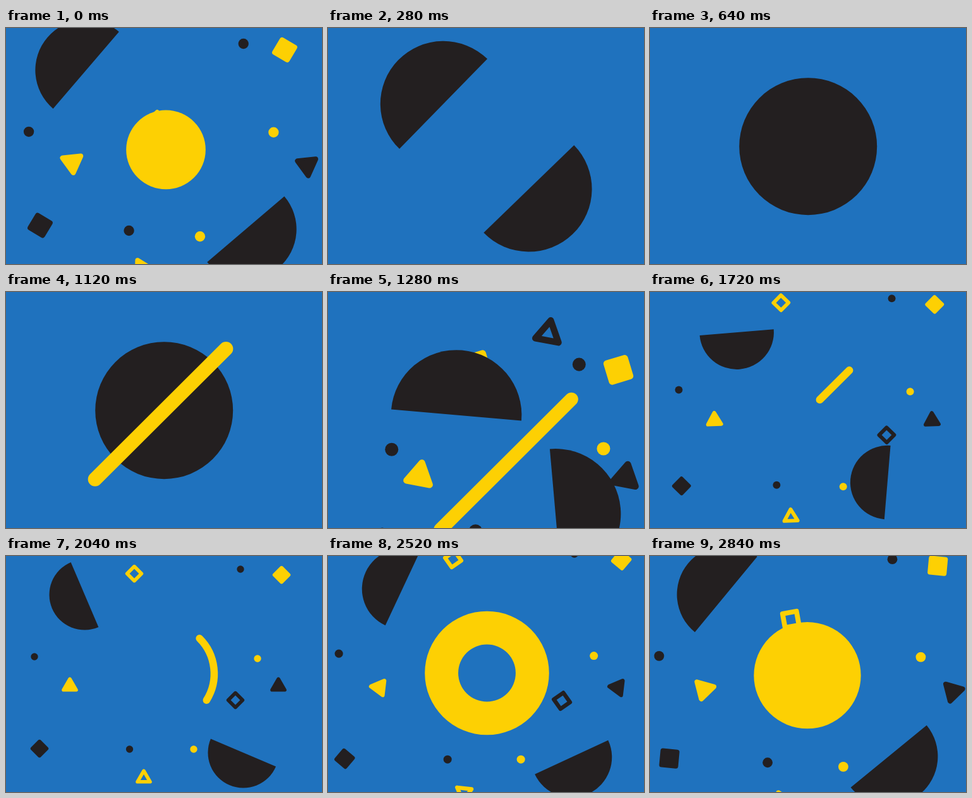
Recreate the animation shown at these times as an HTML page with a canvas. Size 500x375 px, loop 2.88 s.

```html
<!DOCTYPE html>
<html lang="en">
<head>
<meta charset="utf-8">
<title>Shape burst</title>
<style>
  html, body { margin: 0; width: 100%; height: 100%; overflow: hidden; background: #1f72be; }
  canvas { display: block; width: 500px; height: 375px; }
</style>
</head>
<body>
<canvas id="stage" width="500" height="375"></canvas>
<script>
const ctx = document.getElementById('stage').getContext('2d');
const LOOP = 2880, STEP = 40, BURST = 1120;
const BLUE = '#1f72be', YELLOW = '#fdd003', BLACK = '#231f20';
const RING = 79.4, PEN = 11.6, HALF = 56, EDGE = 5.6;

const clamp = (v, a = 0, b = 1) => Math.min(b, Math.max(a, v));
const span = (t, a, b) => clamp((t - a) / (b - a));
const cube = v => v * v * v;
const smooth = p => p * p * (3 - 2 * p);
const inOut = p => p < 0.5 ? 4 * cube(p) : 1 - 4 * cube(1 - p);
const rad = deg => deg * Math.PI / 180;

// Monotone cubic through [time, value] keys
function track(...keys) {
  const n = keys.length;
  const slope = i => (keys[i + 1][1] - keys[i][1]) / (keys[i + 1][0] - keys[i][0]);
  const tan = keys.map((k, i) => {
    if (i === 0 || i === n - 1) return 0;
    const a = slope(i - 1), b = slope(i);
    return a * b <= 0 ? 0 : 2 * a * b / (a + b);
  });
  return t => {
    if (t <= keys[0][0]) return keys[0][1];
    if (t >= keys[n - 1][0]) return keys[n - 1][1];
    let i = 0;
    while (t > keys[i + 1][0]) i++;
    const [t0, v0] = keys[i], [t1, v1] = keys[i + 1];
    const h = t1 - t0, p = (t - t0) / h, q = 1 - p;
    return v0 * (1 + 2 * p) * q * q + v1 * p * p * (3 - 2 * p)
         + h * p * q * (tan[i] * q - tan[i + 1] * p);
  };
}

const camX = track([1120, 250.2], [1280, 281.5], [1480, 266], [2040, 250], [2520, 251.5],
  [2840, 249], [2880, 253], [3160, 250.2]);
const camY = track([1120, 188.2], [1280, 274], [1480, 181], [2040, 187], [2520, 186],
  [2840, 189.7], [2880, 193.4], [3160, 188.2]);
const zoom = track([1120, 1.946], [1280, 1.846], [1480, 1.143], [2040, 1], [2520, 1.143],
  [2840, 1.388], [2880, 1.434], [3120, 1.74], [3380, 1.946]);
const gap = track([1120, 0], [1280, 42.5], [1480, 94], [2040, 125.5], [2520, 117],
  [2840, 92.7], [2880, 88.1], [3120, 48], [3320, 0]);
const turn = track([1120, 0], [1280, 50], [1480, 144], [2040, 292], [2520, 340],
  [2840, 354.4], [2880, 355.5], [3320, 360]);

// Spin: resting angle, burst rate, collapse rate (signed), collapse start
const SPIN = {
  square: [45, 0.01018, -0.0135, 2393],
  frame: [45, 0.01018, 0.012, 2341],
  tri: [0, 0.01483, 0.0133, 2270],
  wedge: [0, 0.01483, 0.0133, 2215],
  dot: [0, 0, 0, 0]
};

// x, y at rest, kind, colour, burst duration, collapse start
const back = [
  [-47, -159, 'frame', YELLOW, 705, 2440, 475],
  [113, 42, 'frame', BLACK, 720, 2303],
  [-32, 166, 'wedge', YELLOW, 660, 2588],
  [67, -208, 'wedge', BLACK, 700, 2585],
  [121, -166, 'dot', BLACK, 740, 2548],
  [-205, -27, 'dot', BLACK, 822, 2560],
  [-54.5, 120, 'dot', BLACK, 822, 2564],
  [186, -157, 'square', YELLOW, 740, 2547],
  [-197, 119, 'square', BLACK, 660, 2547],
  [-149, 20, 'tri', YELLOW, 780, 2543],
  [181, 20, 'tri', BLACK, 660, 2621]
];
const front = [
  [148, -24, 'dot', YELLOW, 660, 2589],
  [47, 120, 'dot', YELLOW, 660, 2588]
];

function polygon(sides, radius, start) {
  ctx.beginPath();
  for (let i = 0; i < sides; i++) {
    const a = rad(start + i * 360 / sides);
    ctx.lineTo(radius * Math.cos(a), radius * Math.sin(a));
  }
  ctx.closePath();
}

function disc(r) {
  ctx.beginPath();
  ctx.arc(0, 0, r, 0, 2 * Math.PI);
  ctx.fill();
}

function piece(t, [x, y, kind, color, out, start, back = 500]) {
  const e = 1 - cube(1 - span(t, BURST, BURST + out)) - cube(span(t, start, start + back));
  if (e <= 0.001) return;
  const [rest, inRate, outRate, from] = SPIN[kind];
  const angle = rest - cube(inRate * Math.max(0, 1804 - t)) + cube(outRate * Math.max(0, t - from));
  const size = Math.min(1, e / 0.25);
  ctx.save();
  ctx.translate(x * e, y * e);
  ctx.rotate(rad(angle));
  ctx.scale(size, size);
  ctx.fillStyle = ctx.strokeStyle = color;
  ctx.lineWidth = EDGE;
  if (kind === 'dot') {
    disc(5.7);
  } else {
    if (kind === 'square' || kind === 'frame') polygon(4, 11.4, 45);
    else polygon(3, 11.6, -90);
    ctx.stroke();
    if (kind === 'square' || kind === 'tri') ctx.fill();
  }
  ctx.restore();
}

function halves(t) {
  const d = gap(t), phi = turn(t);
  ctx.fillStyle = BLACK;
  if (d < 0.05) return disc(HALF);
  for (const [side, angle] of [[-1, 225 + phi], [1, 45 - phi]]) {
    ctx.beginPath();
    ctx.arc(side * d, side * d, HALF, rad(angle - 90), rad(angle + 90));
    ctx.fill();
  }
}

// A stroke that crosses the diagonal, then runs round the circle
function stroke(t) {
  const cut = t >= 3740;
  if (!cut && t >= 2437) return;
  const u = cut ? t - LOOP : t;
  const head = RING * (2 * inOut(span(u, 860, 1200)) - 1);
  const tail = RING * (2 * inOut(span(u, 1360, 2030)) - 1);
  const sweep = 2 * Math.PI * inOut(span(u, 1800, 2437));
  ctx.save();
  ctx.rotate(-Math.PI / 4);
  ctx.strokeStyle = YELLOW;
  ctx.lineWidth = PEN;
  ctx.beginPath();
  ctx.moveTo(tail, 0);
  ctx.lineTo(head, 0);
  if (sweep > 0) ctx.arc(0, 0, RING, 0, sweep);
  ctx.stroke();
  ctx.restore();
}

function ring(t) {
  if (t < 2437 || t >= 2947) return;
  const outer = 86 * (1 - cube(span(t, 2630, 2947)));
  const inner = 73.7 * (1 - smooth(span(t, 2430, 2620)));
  ctx.fillStyle = YELLOW;
  ctx.beginPath();
  ctx.arc(0, 0, outer, 0, 2 * Math.PI);
  if (inner > 0) ctx.arc(0, 0, inner, 0, 2 * Math.PI, true);
  ctx.fill();
}

function draw(time) {
  const t = time < BURST || time === BURST ? time + LOOP : time;
  const k = zoom(t);
  ctx.setTransform(1, 0, 0, 1, 0, 0);
  ctx.fillStyle = BLUE;
  ctx.fillRect(0, 0, 500, 375);
  ctx.setTransform(k, 0, 0, k, camX(t), camY(t));
  ctx.lineCap = ctx.lineJoin = 'round';
  back.forEach(p => piece(t, p));
  halves(t);
  front.forEach(p => piece(t, p));
  stroke(t);
  ring(t);
}

const begin = performance.now();
function tick() {
  const now = Math.max(0, performance.now() - begin) % LOOP;
  draw(Math.floor(now / STEP + 0.01) * STEP % LOOP);
  requestAnimationFrame(tick);
}
tick();
</script>
</body>
</html>
```
